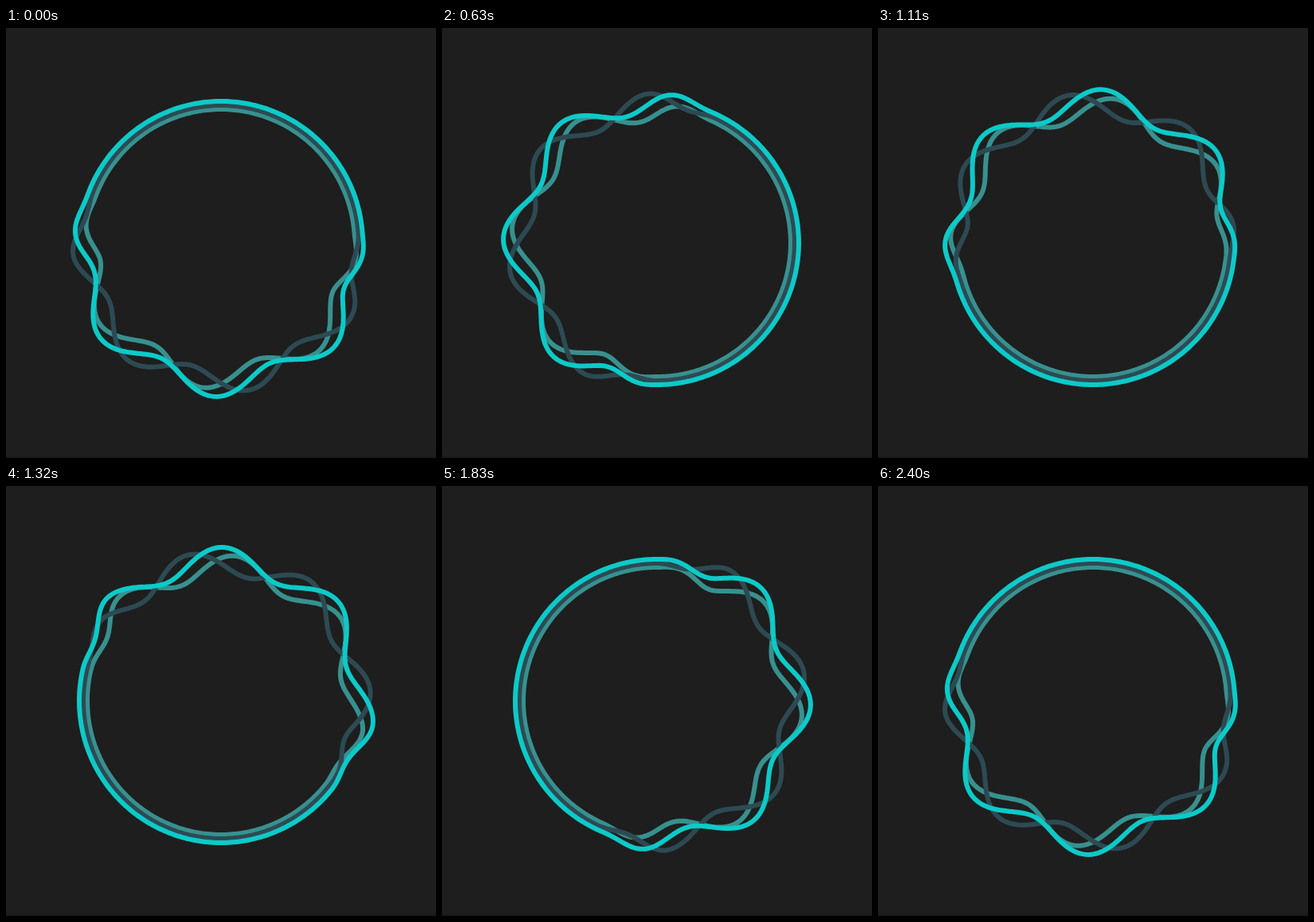
Recreate the animation shown at these times as an HTML page. Size 540 by 540 pixels, loop 2.43 s.

```html
<!DOCTYPE html>
<html lang="en">
<head>
<meta charset="utf-8">
<title>Wavy rings</title>
<style>
  html, body { margin: 0; width: 100%; height: 100%; overflow: hidden; background: #1e1e1e; }
  svg { display: block; width: 100vw; height: 100vh; }
  path { fill: none; stroke-width: 6; stroke-linejoin: round; }
</style>
</head>
<body>
<svg viewBox="0 0 540 540">
  <rect width="540" height="540" fill="#1e1e1e"/>
  <rect y="538" width="540" height="2" fill="#1b181c"/>
  <g id="rings"></g>
</svg>
<script>
const LOOP = 2430, STEP = 30, TURN = 2400;
const CENTER = 270, AMP = 15;
const WAVE = 49.5;                 // wavelength in degrees
const FULL = 73, EDGE = 103;       // the wave fades out between these offsets
const RAD = Math.PI / 180;

// shift: wave offset in degrees, clockwise from the right
const rings = [
  { r: 168, shift: 5, color: '#37918f' },
  { r: 173, shift: -13, color: '#2d4a53' },
  { r: 178, shift: 0, color: '#0dcac8' }
];

const group = document.getElementById('rings');
for (const ring of rings) {
  ring.path = document.createElementNS('http://www.w3.org/2000/svg', 'path');
  ring.path.setAttribute('stroke', ring.color);
  group.appendChild(ring.path);
}

function envelope(offset) {
  const k = Math.min(1, Math.max(0, (EDGE - Math.abs(offset)) / (EDGE - FULL)));
  return k * k * (3 - 2 * k);
}

function outline(ring, turn) {
  const mid = 98 + 360 * turn;
  const lead = 5.8 + 8 * WAVE * turn - ring.shift;
  let d = '';
  for (let off = -180; off < 180; off++) {
    const wave = Math.cos((off + lead) / WAVE * 2 * Math.PI);
    const r = ring.r + AMP * envelope(off) * wave;
    const a = (mid + off) * RAD;
    const x = CENTER + r * Math.cos(a), y = CENTER + r * Math.sin(a);
    d += (d ? 'L' : 'M') + x.toFixed(2) + ' ' + y.toFixed(2);
  }
  return d + 'Z';
}

function render(ms) {
  const t = Math.floor((ms % LOOP) / STEP) * STEP;
  for (const ring of rings) ring.path.setAttribute('d', outline(ring, t / TURN));
}

let start = null;
function tick(now) {
  if (start === null) start = now;
  render(now - start);
  requestAnimationFrame(tick);
}
render(0);
requestAnimationFrame(tick);
</script>
</body>
</html>
```
